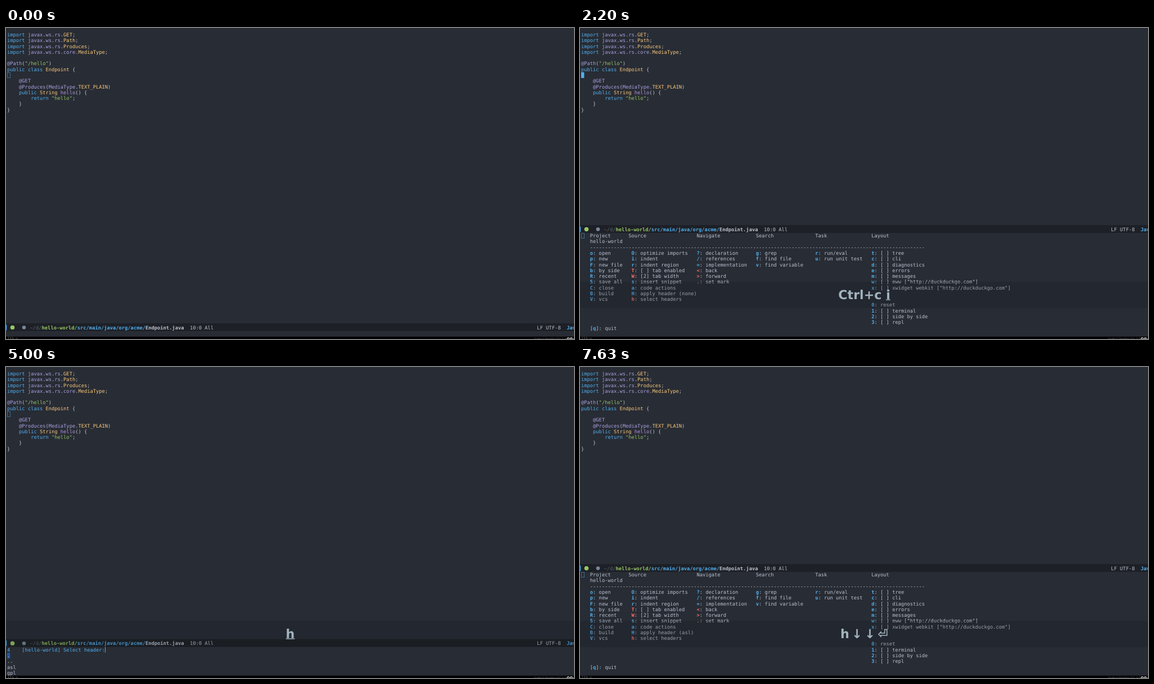
Write an HTML page with a canvas that moves like this. It is 1010 px wide and 554 px high and loops after 8 s.

```html
<!DOCTYPE html>
<html lang="en">
<head>
<meta charset="utf-8">
<title>Editor session</title>
<style>
  html, body { margin: 0; width: 100%; height: 100%; overflow: hidden; background: #282c34; }
  canvas { display: block; }
</style>
</head>
<body>
<canvas id="stage" width="1010" height="554"></canvas>
<script>
const ctx = document.getElementById('stage').getContext('2d');
const LOOP = 8000, CELL = 5.268, LINE = 10.27, LEFT = 2;
const MONO = '8.75px "DejaVu Sans Mono", monospace';
const KEYS_FONT = 'bold 22.2px "DejaVu Sans", sans-serif';
const BG = '#282c34';
const COLORS = { f: '#bbc2cf', b: '#51afef', v: '#a9a1e1', y: '#fac87b', g: '#98c465', m: '#b596e0', r: '#ff6c6b', d: '#5b6268' };

// Markup: ^x switches colour, an upper case letter also means bold.
const CODE = `^bimport ^vjavax^f.^vws^f.^vrs^f.^yGET^f;
^bimport ^vjavax^f.^vws^f.^vrs^f.^yPath^f;
^bimport ^vjavax^f.^vws^f.^vrs^f.^yProduces^f;
^bimport ^vjavax^f.^vws^f.^vrs^f.^vcore^f.^yMediaType^f;

^v@Path^f(^g"/hello"^f)
^bpublic class ^yEndpoint^f {

    ^v@GET
    ^v@Produces^f(^vMediaType^f.^yTEXT_PLAIN^f)
    ^bpublic ^yString ^mhello^f() {
        ^breturn ^g"hello"^f;
    }
}`.split('\n');

// Each menu column: heading column, entry column, heading, entries.
const MENU = [
  [3, 3, 'Project', 'o open|p new|F new file|b by side|R recent|S save all|C close|B build|V vcs'],
  [16, 17, 'Source', 'O optimize imports|i indent|r indent region|T [ ] tab enabled|W [2] tab width|s insert snippet|a code actions|H apply header (HEADER)|h select headers'],
  [39, 39, 'Navigate', '? declaration|/ references|= implementation|< back|> forward|. set mark'],
  [59, 59, 'Search', 'g grep|f find file|v find variable'],
  [79, 79, 'Task', 'r run/eval|u run unit test'],
  [98, 98, 'Layout', 't [ ] tree|c [ ] cli|d [ ] diagnostics|e [ ] errors|m [ ] messages|w [ ] eww ["http://duckduckgo.com"]|x [ ] xwidget webkit ["http://duckduckgo.com"]|||0 reset|1 [ ] terminal|2 [ ] side by side|3 [ ] repl'],
];
const RED_KEYS = 'TW<>.h';

// Timelines: [start, value...]
const VIEW = [[0, 'plain'], [2200, 'menu', 'none'], [5000, 'select'], [7170, 'menu', 'asl']];
const CURSOR = [[0, 'hollow'], [300, 'solid'], [630, 'off'], [1100, 'solid'], [1600, 'off'], [2200, 'solid'],
  [2630, 'off'], [3230, 'solid'], [3730, 'off'], [4270, 'solid'], [4630, 'off'], [5000, 'hollow'],
  [7170, 'solid'], [7630, 'off']];
const BAR = [[0, true], [5370, false], [5730, true], [6570, false], [7000, true]];
const PICKED = [[0, 1], [5730, 2], [6030, 3]];
// start, earlier keys, newest key, how long the newest stays underlined
const PRESSES = [[0, '', '', 0], [1400, '', 'Ctrl+c', 130], [2200, 'Ctrl+c ', 'i', 130], [5000, '', 'h', 170],
  [5730, 'h\u2009', '↓', 170], [6030, 'h\u2009↓\u2009', '↓', 170], [7170, 'h\u2009↓\u2009↓\u2009', '⏎', 130]];

const at = (timeline, t) => timeline.filter(step => step[0] <= t).pop();

function rect(x, y, w, h, color) {
  ctx.fillStyle = color;
  ctx.fillRect(x, y, w, h);
}

function dot(x, y, r, color) {
  ctx.fillStyle = color;
  ctx.beginPath();
  ctx.arc(x, y, r, 0, 2 * Math.PI);
  ctx.fill();
}

function label(text, x, y, font, color) {
  ctx.font = font;
  ctx.fillStyle = color;
  ctx.fillText(text, x, y);
}

function print(markup, x, top) {
  for (const span of ('^f' + markup).split('^').slice(1)) {
    const code = span[0], bold = code < 'a';
    const font = (bold ? 'bold ' : '') + MONO, color = COLORS[code.toLowerCase()];
    for (const ch of span.slice(1)) {
      label(ch, x, top + 8.1, font, color);
      x += CELL;
    }
  }
}

const printAt = (markup, col, top) => print(markup, LEFT + col * CELL, top);

function hollowCursor(y) {
  ctx.strokeStyle = 'rgba(81,175,239,.5)';
  ctx.lineWidth = 1;
  ctx.strokeRect(2.5, y + .5, 5, 9);
}

function modeLine(bottom) {
  const top = bottom - 11.4, mid = bottom - 6.3;
  rect(0, bottom - 13.8, 1010, 13.8, '#1d2026');
  rect(0, mid - 5, 1.2, 10, COLORS.b);
  dot(11.5, mid, 3.8, COLORS.g);
  dot(32, mid, 3.3, '#76879b');
  print('^d~/d/^Ghello-world/^Bsrc/main/java/org/acme/^FEndpoint.java^f  10:0 All', 42.5, top);
  print('LF UTF-8  ^BJava', 944.3, top);
}

function menu(header) {
  const top = 365.1, row = n => top + n * LINE;
  hollowCursor(365);
  for (const [headCol, col, head, entries] of MENU) {
    printAt(head, headCol, top);
    entries.split('|').forEach((entry, i) => {
      if (!entry) return;
      const key = entry[0], tint = RED_KEYS.includes(key) ? 'R' : 'B';
      printAt(`^${tint}${key}^f:${entry.slice(1).replace('HEADER', header)}`, col, row(i + 3));
    });
  }
  printAt('hello-world', 3, row(1));
  printAt('-'.repeat(113), 3, row(2));
  printAt('[^Bq^f]: quit', 3, row(16));
}

function selector(t) {
  const top = 498.6, items = ['.', '..', 'asl', 'gpl'], picked = at(PICKED, t)[1];
  printAt('^b4    [hello-world] Select header:', 0, top);
  if (at(BAR, t)[1]) rect(176, 498.5, 1, 10.5, COLORS.b);
  items.forEach((item, i) => {
    const y = top + (i + 1) * LINE;
    if (i + 1 === picked) rect(LEFT, y, item.length * CELL, LINE, '#2257a0');
    printAt(item, 0, y);
  });
}

function bottomStrip() {
  rect(0, 549.8, 1010, 4.2, '#000');
  ctx.save();
  ctx.beginPath();
  ctx.rect(0, 549.8, 1010, 4.2);
  ctx.clip();
  label('[1]', 4, 555, '6px "DejaVu Sans", sans-serif', '#777');
  label('1: 36', 12, 553.6, '3.5px "DejaVu Sans", sans-serif', '#555');
  label('Sunday 07 November 2021 11:03', 939, 553.6, '3.5px "DejaVu Sans", sans-serif', '#555');
  label('09:4', 997, 556.5, 'bold 8px "DejaVu Sans", sans-serif', '#ddd');
  ctx.restore();
}

function keyOverlay(t) {
  const [start, earlier, newest, underline] = at(PRESSES, t);
  if (!newest) return;
  rect(0, 452, 1010, 47, 'rgba(16,24,26,.2)');
  ctx.font = KEYS_FONT;
  const before = ctx.measureText(earlier).width, last = ctx.measureText(newest).width;
  const x = 505.5 - (before + last) / 2;
  label(earlier + newest, x, 483, KEYS_FONT, '#a2b4bf');
  if (t - start < underline) rect(x + before, 483.5, last, 1.4, '#a2b4bf');
}

function draw(t) {
  const [, view, header] = at(VIEW, t), cursor = at(CURSOR, t)[1];
  rect(0, 0, 1010, 554, BG);
  CODE.forEach((line, i) => printAt(line, 0, 7 + i * LINE));
  if (cursor === 'solid') rect(2, 78.8, 5.4, 10.3, COLORS.b);
  if (cursor === 'hollow') hollowCursor(79);
  modeLine({ plain: 539.8, menu: 364.9, select: 498.6 }[view]);
  if (view === 'menu') menu(header);
  if (view === 'select') selector(t);
  bottomStrip();
  keyOverlay(t);
}

ctx.textRendering = 'geometricPrecision';
const begin = performance.now();
(function frame() {
  draw((performance.now() - begin) % LOOP);
  requestAnimationFrame(frame);
})();
</script>
</body>
</html>
```
